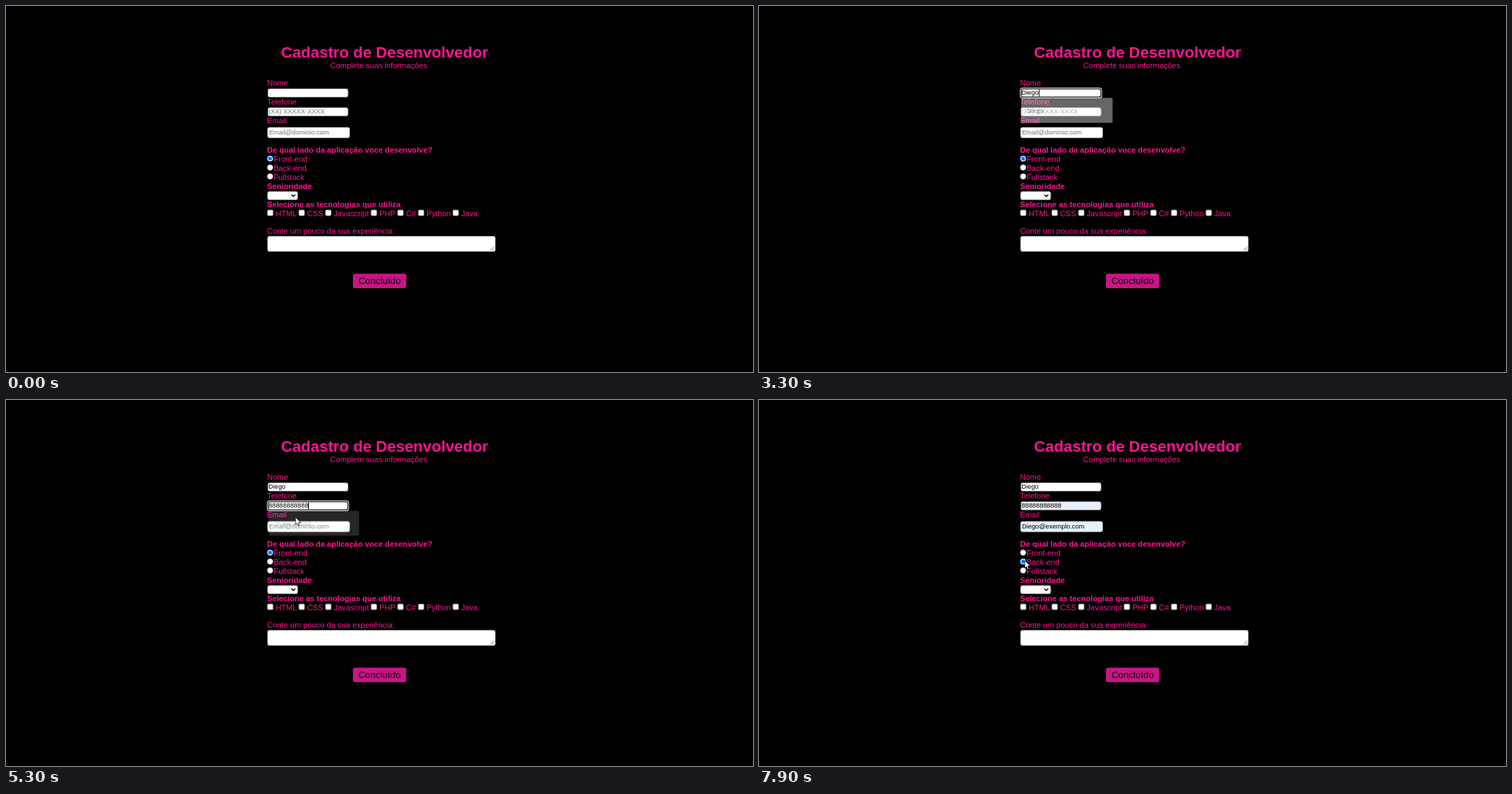
Animation, 1068 px wide and 524 px high, one loop 8 s. Source, as an HTML page with a canvas:

```html
<!DOCTYPE html>
<html lang="pt">
<head>
<meta charset="utf-8">
<title>Cadastro de Desenvolvedor</title>
<style>
html, body { margin: 0; width: 100%; height: 100%; overflow: hidden; background: #000; }
canvas { display: block; }
</style>
</head>
<body>
<canvas id="stage" width="1068" height="524"></canvas>
<script>
const c = document.getElementById('stage').getContext('2d');
const LOOP = 8000, STEP = 100;
const PINK = '#ff1493', GRAY = '#767676', BLUE = '#0075ff', TINT = '#e8f0fe';
const SANS = '"Liberation Sans", Arial, sans-serif';
const POPUP_FONT = '600 8.4px "Open Sans", "Noto Sans", sans-serif';
const NAME = 'Diego', PHONE = '88888888888', MAIL = 'Diego@exemplo.com';

const between = (t, a, b) => t >= a && t < b;

function text(s, x, y, size = 11.2, color = PINK, weight = '') {
  c.font = `${weight} ${size}px ${SANS}`;
  c.fillStyle = color;
  c.fillText(s, x, y);
}

function box(x, y, w, h, r, fill, stroke) {
  c.beginPath();
  c.roundRect(x, y, w, h, r);
  c.fillStyle = fill;
  c.fill();
  if (stroke) {
    c.strokeStyle = stroke;
    c.lineWidth = 0.8;
    c.stroke();
  }
}

function line(points, color, width) {
  c.beginPath();
  points.forEach(([x, y]) => c.lineTo(x, y));
  c.strokeStyle = color;
  c.lineWidth = width;
  c.stroke();
}

function disc(x, y, r, color) {
  c.beginPath();
  c.arc(x, y, r, 0, 7);
  c.fillStyle = color;
  c.fill();
}

function field(x, y, w, h, { value, hint = '', focus, caret, fill = '#fff' }) {
  if (focus) {
    box(x - 0.9, y - 0.9, w + 1.8, h + 1.8, 3.5, '#fff');
    box(x, y, w, h, 3, '#101010');
    box(x + 1.3, y + 1.3, w - 2.6, h - 2.6, 2, fill);
  } else {
    box(x + 0.4, y + 0.4, w - 0.8, h - 0.8, 2.8, fill, GRAY);
  }
  const tx = x + (h > 14 ? 2.4 : 1.3), mid = y + h / 2;
  text(value || hint, tx, mid + 2.9, 9.33, value ? '#000' : '#757575');
  if (caret) {
    const cx = Math.round(tx + (value ? c.measureText(value).width : 0));
    c.fillStyle = '#000';
    c.fillRect(cx, mid - 5, 1, 10);
  }
}

function radio(y, label, on) {
  disc(377.6, y, 4.5, on ? BLUE : GRAY);
  disc(377.6, y, 3.7, '#fff');
  if (on) disc(377.6, y, 2.7, BLUE);
  text(label, 382.4, y + 4.8);
}

function checkbox(x, label) {
  box(x + 0.4, 292, 8.2, 8.2, 1.6, '#fff', GRAY);
  text(label, x + 12.2, 300.8);
}

// Suggestion list: appears at half strength, leaves at strength `last`.
function popup(t, from, end, last, y, label) {
  if (!between(t, from, end + STEP)) return;
  const alpha = t === from ? 0.5 : t === end ? last : 1;
  const inset = 2.9 * (1 - alpha);
  c.save();
  c.globalAlpha = alpha;
  box(373.3 + inset, y + inset / 3, 134 - 2 * inset, 36.6 - inset / 2, 2.5, '#fff');
  c.font = POPUP_FONT;
  c.fillStyle = '#202124';
  c.fillText(label, 382 + inset, y + 21.5);
  c.restore();
}

const PATHS = [
  [[700, 106, 0], [900, 250, 62], [1100, 440, 146], [1200, 498, 166], [1300, 455, 148]],
  [[4600, 421, 160], [4800, 421, 163], [5000, 418, 166], [5300, 414, 168], [5500, 438, 171]],
  [[6300, 438, 191], [6500, 423, 198], [6900, 423.5, 199], [7400, 379, 228], [7800, 379, 228], [7900, 380, 230]]
];

function pointer(t) {
  const path = PATHS.find(p => between(t, p[0][0], p.at(-1)[0] + STEP));
  if (!path) return;
  const i = path.findIndex(k => k[0] >= t);
  const b = path[i], a = path[i - 1] || b;
  const f = b === a ? 0 : (t - a[0]) / (b[0] - a[0]);
  c.save();
  c.translate(a[1] + (b[1] - a[1]) * f, a[2] + (b[2] - a[2]) * f);
  c.beginPath();
  [[0, 0], [0, 10.6], [2.4, 8.4], [4, 12], [5.7, 11.2], [4.2, 7.7], [7.5, 7.5]].forEach(([x, y]) => c.lineTo(x, y));
  c.closePath();
  c.fillStyle = '#fff';
  c.strokeStyle = '#000';
  c.lineWidth = 0.7;
  c.fill();
  c.stroke();
  c.restore();
}

function beam(t) {
  c.save();
  c.globalCompositeOperation = 'difference';
  c.fillStyle = '#bbb';
  if (between(t, 1400, 1800)) {
    c.fillRect(419, 131, 1, 2);
    c.fillRect(418, 133, 4, 1);
  } else if (between(t, 1800, 3800)) {
    c.fillRect(419, 130, 1, 2);
  } else if (between(t, 5600, 6300)) {
    c.fillRect(463, 170, 1, 11);
    c.fillRect(461, 169, 5, 1);
    c.fillRect(461, 181, 5, 1);
  }
  c.restore();
}

function draw(t) {
  c.fillStyle = '#000';
  c.fillRect(0, 0, 1068, 524);

  text('Cadastro de Desenvolvedor', 393.2, 73.6, 22.4, PINK, 'bold');
  text('Complete suas informações', 463.6, 88.6);

  const typed = t < 2400 ? 0 : t < 2700 ? 1 : Math.min(5, 2 + Math.floor((t - 2700) / 200));
  text('Nome', 373.3, 114.4);
  field(374, 118, 115.5, 13, {
    value: NAME.slice(0, typed),
    focus: between(t, 1500, 4300),
    caret: between(t, 1500, 2000) || between(t, 2400, 3800)
  });

  text('Telefone', 373.3, 141.4);
  field(374, 145, 115.5, 13, {
    value: t >= 5000 ? PHONE : '',
    hint: '(XX) XXXXX-XXXX',
    focus: between(t, 4300, 5700),
    caret: between(t, 4300, 4800) || between(t, 5200, 5700),
    fill: t >= 7000 ? TINT : '#fff'
  });

  text('Email', 373.3, 168.2);
  field(373.5, 173.3, 118.4, 16, {
    value: t >= 6400 ? MAIL : '',
    hint: 'Email@dominio.com',
    focus: between(t, 5700, 7600),
    caret: between(t, 5700, 6200) || between(t, 6700, 7200),
    fill: t >= 7000 ? TINT : '#fff'
  });

  text('De qual lado da aplicação voce desenvolve?', 373.3, 210.4, 11.2, PINK, 'bold');
  const back = t >= 7600;
  radio(218.5, 'Front-end', !back);
  radio(231.3, 'Back-end', back);
  radio(244, 'Fullstack', false);

  text('Senioridade', 373.3, 262, 11.2, PINK, 'bold');
  box(373.9, 265.4, 43.2, 12.2, 2.8, '#fff', GRAY);
  line([[408, 270], [410.8, 272.8], [413.6, 270]], '#000', 1.4);

  text('Selecione as tecnologias que utiliza', 373.3, 287.9, 11.2, PINK, 'bold');
  [[373.3, 'HTML'], [418.3, 'CSS'], [456.3, 'Javascript'], [521.5, 'PHP'],
   [559.5, 'C#'], [589, 'Python'], [638.5, 'Java']].forEach(item => checkbox(...item));

  text('Conte um pouco da sua experiência:', 373.3, 326.3);
  box(373.9, 329.6, 325.8, 22, 2.8, '#fff', GRAY);
  line([[692.5, 350], [698, 344.5]], '#555', 0.8);
  line([[695.5, 350], [698, 347.5]], '#555', 0.8);

  box(496, 383.3, 76.3, 20.7, 3, '#c71585');
  text('Concluído', 503.9, 398, 13.44, '#000');

  popup(t, 2400, 3300, 0.4, 131, NAME);
  popup(t, 4300, 5300, 0.15, 158, PHONE);
  popup(t, 5700, 6900, 0.4, 189.5, MAIL);
  beam(t);
  pointer(t);
}

function frame(now) {
  draw(Math.floor(now % LOOP / STEP) * STEP);
  requestAnimationFrame(frame);
}
requestAnimationFrame(frame);
</script>
</body>
</html>
```
